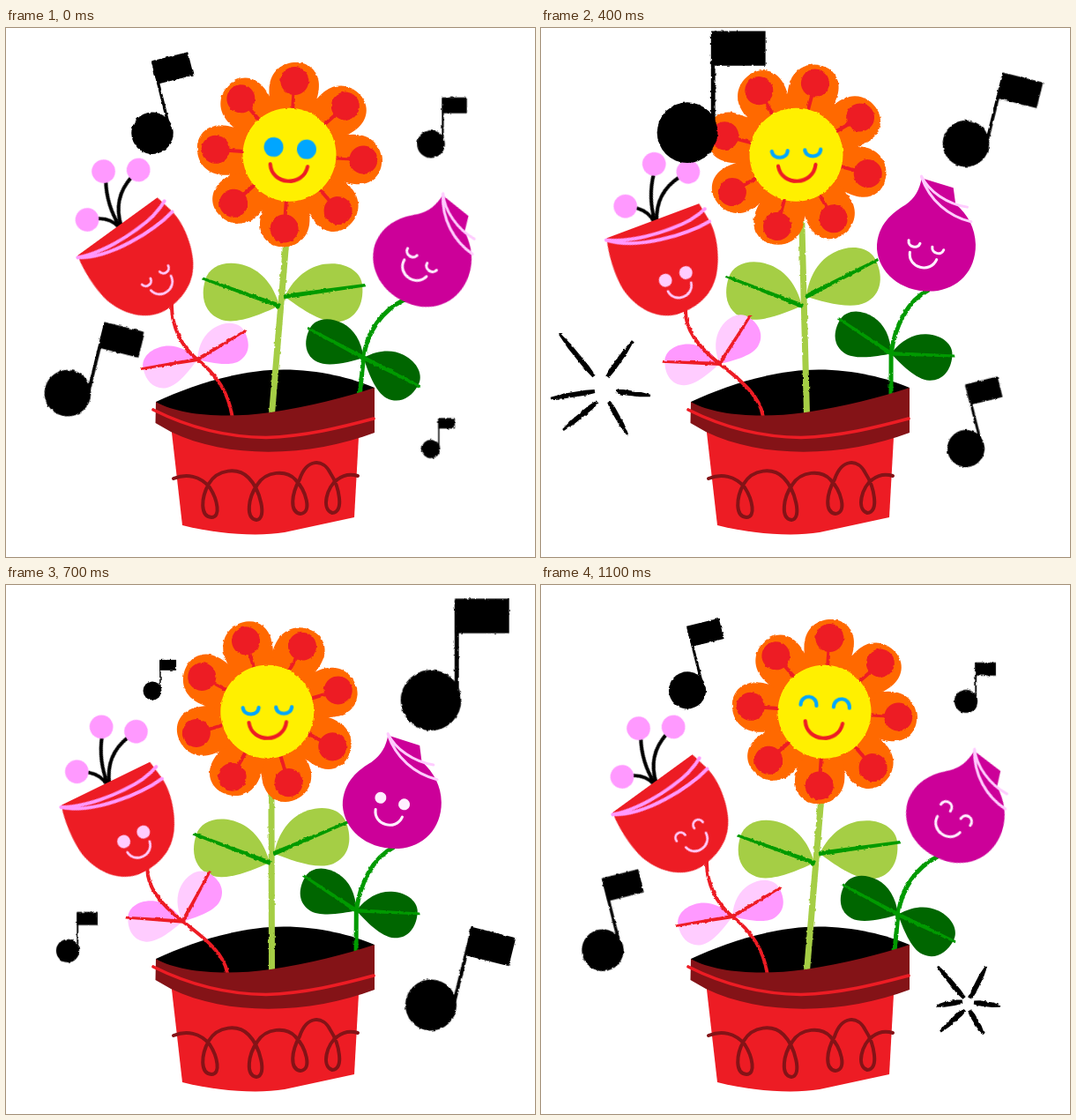
An HTML page for the animation above (1200 ms loop, 600 px wide and 600 px high).

```html
<!DOCTYPE html>
<html lang="en">
<head>
<meta charset="utf-8">
<title>Singing flowers</title>
<style>
  html, body { margin: 0; width: 100%; height: 100%; overflow: hidden; background: #fff; }
  svg { display: block; width: 100%; height: 100%; }
</style>
</head>
<body>
<svg viewBox="0 0 600 600">
  <defs>
    <filter id="rough" filterUnits="userSpaceOnUse" x="0" y="0" width="600" height="600" color-interpolation-filters="sRGB">
      <feTurbulence type="fractalNoise" baseFrequency="0.2" numOctaves="2" seed="4"/>
      <feDisplacementMap in="SourceGraphic" scale="2.8" xChannelSelector="R" yChannelSelector="G"/>
    </filter>
  </defs>
  <g id="stage"></g>
</svg>
<script>
const STEP = 100, STEPS = 12;
const RED = '#ed1c24', DARK = '#841317', ORANGE = '#ff6900', YELLOW = '#fff000', BLUE = '#00a6ff';
const LIME = '#a5ce45', GREEN = '#009a00', FOREST = '#006600';
const PINK = '#ff99ff', PALE = '#ffccff', PURPLE = '#cc0099';

// Pose values are given at these steps and blended in between.
const KEYS = [0, 1, 3, 5, 7, 9, 11];
const SUN_SWAY = [0, .2, .6, 1, .63, .33, 0];
const SUN_SPIN = [4, 6.9, 12.2, 17.4, 28.2, 39.2, 49];
const CUP_SWAY = [0, .2, .6, 1, .92, .5, 0];
const CUP_X = [168, 163.5, 155, 150, 144.5, 156, 168];
const CUP_Y = [279, 278, 280, 283.5, 285.5, 281, 279];
const CUP_TILT = [-36, -31.5, -24, -17, -26, -31, -36];
const BUD_SWAY = [0, .2, .6, 1, .78, .42, .05];

// Eyes per step: o open, U shut, n smiling.
const SUN_EYES = 'ooooUUUUnnnn', CUP_EYES = 'UUUUoooooonn', BUD_EYES = 'UUUUUUoonnnn';

function at(values, k) {
  let i = 0;
  while (i < KEYS.length - 2 && k > KEYS[i + 1]) i++;
  const t = (k - KEYS[i]) / (KEYS[i + 1] - KEYS[i]);
  return values[i] + (values[i + 1] - values[i]) * t;
}

const fill = (d, color) => `<path d="${d}" fill="${color}"/>`;
const line = (d, color, width) =>
  `<path d="${d}" fill="none" stroke="${color}" stroke-width="${width}" stroke-linecap="round" stroke-linejoin="round"/>`;
const dot = (x, y, r, color) => `<circle cx="${x}" cy="${y}" r="${r}" fill="${color}"/>`;
const group = (transform, body) => `<g transform="${transform}">${body}</g>`;
const rough = body => `<g filter="url(#rough)">${body}</g>`;
const place = (x, y, turn = 0, sx = 1, sy = sx) =>
  `translate(${x} ${y}) scale(${sx} ${sy}) rotate(${turn})`;

function face(type, eyeColor, mouthColor, r) {
  const eye = x =>
    type === 'o' ? dot(x, -7.4, r, eyeColor) :
    type === 'U' ? line(`M${x - 9},-5 C${x - 8},5 ${x + 8},5 ${x + 9},-5`, eyeColor, 4.2) :
    line(`M${x - 9},-6 C${x - 9},-19 ${x + 9},-19 ${x + 9},-6`, eyeColor, 4.2);
  return eye(-18.5) + eye(19) + line('M-21,12 C-18,36 18,36 21.5,12', mouthColor, 4.2);
}

// A leaf points along +x from its base; flip -1 mirrors it to the left.
function leaf(l, top, bottom) {
  return group(place(l.x, l.y, l.turn, l.size * l.flip, l.size),
    fill('M0,0 C14,-20 32,-30 50,-30 C74,-30 90,-16 89,0Z', top) +
    fill('M0,0 C14,14 38,37 57,37 C76,37 88,22 89,0Z', bottom));
}
function vein(l, color) {
  const w = 2 / Math.sqrt(l.size);
  return group(place(l.x, l.y, l.turn, l.size * l.flip, l.size),
    fill(`M-1,${-w * 1.3} L92,${-w * .8} L93,${w * .8} L-1,${w * 1.3}Z`, color));
}

function sunflower(k) {
  const s = at(SUN_SWAY, k), cx = 321.5 - 40 * s, spin = at(SUN_SPIN, k);
  const left = { x: 310 - 17.5 * s, y: 315, turn: -19.6 - 2 * s, size: 1, flip: -1 };
  const right = { x: 316 - 19 * s, y: 304.5, turn: -8 - 24 * s, size: 1, flip: 1 };
  const topX = 319.5 - 29.5 * s;
  let petals = '', seeds = '';
  for (let i = 0; i < 8; i++) {
    const turn = `rotate(${spin + i * 45})`;
    petals += group(turn, fill('M0,0 C-14,-30 -30,-55 -28,-78 C-26,-97 -11,-105 2,-105 C18,-105 29,-93 28,-76 C27,-55 14,-30 0,0Z', ORANGE));
    seeds += group(turn, line('M0,-50 L0,-74', RED, 4) + dot(0, -84, 16, RED));
  }
  return leaf(left, LIME, LIME) + leaf(right, LIME, LIME) +
    rough(line(`M301.5,438 L${topX},222`, LIME, 7) + vein(left, GREEN) + vein(right, GREEN) +
      group(place(cx, 143.7), petals + seeds + dot(0, 0, 53, YELLOW))) +
    group(place(cx, 143.7, 4 - 8 * s), face(SUN_EYES[k], BLUE, RED, 11));
}

function cupFlower(k) {
  const s = at(CUP_SWAY, k);
  const jx = 217 - 18 * s, jy = 376 + 6 * s, tx = 188 - 30 * s, ty = 312 + 10 * s;
  const left = { x: jx, y: jy, turn: 9.5 - 14.5 * s, size: .7, flip: -1 };
  const right = { x: jx, y: jy, turn: -31 - 33 * s, size: .7, flip: 1 };
  const stem = `M${256.5 - 6 * s},440 C${253 - 6 * s},418 ${jx + 26},${jy + 20} ${jx},${jy}` +
    ` C${jx - 18},${jy - 14} ${tx - 1},${ty + 25} ${tx},${ty}`;
  const head =
    line('M0,-66 Q2,-95 18,-118', '#000', 4) +
    line('M2,-66 Q12,-97 44,-104', '#000', 4) +
    line('M-1,-66 Q-2,-79 -14,-88', '#000', 4) +
    dot(22, -128, 13.3, PINK) + dot(55, -106, 13.3, PINK) + dot(-25.3, -94.5, 13.3, PINK) +
    fill('M-58,-68 L54,-68 L58,-47 C62,-25 52,5 41,19 C28,36 8,42 -13,41 C-40,38 -56,14 -61,-8 C-64,-25 -63,-48 -58,-68Z', RED) +
    line('M-59,-66 C-30,-52 30,-47 58,-60', PINK, 4) +
    line('M-59,-66 C-30,-43 30,-40 58,-45', PINK, 4) +
    group(place(0, 5, 0, .66), face(CUP_EYES[k], PALE, PALE, 11.3));
  return leaf(left, PINK, PALE) + leaf(right, PALE, PINK) +
    rough(line(stem, RED, 4) + vein(left, RED) + vein(right, RED)) +
    group(place(at(CUP_X, k), at(CUP_Y, k), at(CUP_TILT, k)), head);
}

function budFlower(k) {
  const s = at(BUD_SWAY, k);
  const bx = 405.5 - 10.5 * s, by = 374 - 6 * s, ex = 451 - 14.5 * s, ey = 308.5 - 14 * s;
  const left = { x: bx, y: by, turn: -28 - 7 * s, size: .78, flip: -1 };
  const right = { x: bx, y: by, turn: 27 - 31 * s, size: .78, flip: 1 };
  const stem = `M${401 - 5 * s},418 L${bx},${by} C${bx + 4},${by - 30} ${ex - 24},${ey + 12} ${ex},${ey}`;
  const head =
    fill('M1,-76 L36,-62 L37,-44 C50,-30 57,-15 56,4 C54,34 32,53 4,53 C-32,52 -56,28 -56,0 C-54,-28 -34,-40 -20,-47 C-8,-54 -2,-64 1,-76Z', PURPLE) +
    line('M1,-78 C8,-60 28,-44 50,-39', PALE, 3) +
    line('M1,-77 C8,-50 28,-30 53,-22', PALE, 3) +
    group('rotate(20) translate(0 4) scale(.74)', face(BUD_EYES[k], '#ffeeff', '#ffeeff', 8.8));
  return leaf(left, FOREST, FOREST) + leaf(right, FOREST, FOREST) +
    rough(line(stem, GREEN, 5) + vein(left, GREEN) + vein(right, GREEN)) +
    group(place(472 - 44 * s, 262 - 20 * s, 17 - 27 * s), head);
}

const RAYS = [
  [-49, -68, -10, -20], [34, -60, 5, -19], [-59, 5, -9, -3],
  [54, 2, 15, -3], [-45, 41, -6, 9], [28, 46, 7, 9]
];
const SMALL_RAYS = [
  [-32, -45, -2, -9], [23, -45, 5, -9], [-34, 0, -4, -5],
  [39, 0, 9, -4], [-29, 29, -1, 4], [20, 32, 4, 5]
];

// A brush stroke, thickest in the middle.
function ray([x1, y1, x2, y2]) {
  const len = Math.hypot(x2 - x1, y2 - y1);
  const p = (t, w) =>
    `${x1 + (x2 - x1) * t + (y1 - y2) / len * w},${y1 + (y2 - y1) * t + (x2 - x1) / len * w}`;
  return fill(`M${p(0, 1.2)} L${p(.3, 2.8)} L${p(.8, 3)} L${p(1, 2)} L${p(1, -2)} L${p(.8, -3)} L${p(.3, -2.8)} L${p(0, -1.2)}Z`, '#000');
}

// A note swells for ten phases, then pops into rays.
function note(x, y, phase) {
  if (phase > 9) return group(place(x, y), (phase === 10 ? RAYS : SMALL_RAYS).map(ray).join(''));
  const r = 10.5 + 2.65 * phase;
  const tilt = [0, -14, 14, 0][Math.floor(phase / 3)];
  return group(place(x, y - .15 * phase, tilt, r),
    dot(0, 0, 1, '#000') +
    fill('M.78,-3.3 H.92 V-.35 H.78Z', '#000') +
    fill('M.79,-3.35 H2.58 V-2.21 H.79Z', '#000'));
}

const POT_BACK = fill('M170,424 C210,405 265,387.500 315,387.500 C355,387.500 392,397 418,408 L418,430 L250,450 L170,430Z', '#000');
const POT_FRONT =
  fill('M187,450 L200,564 C240,574 285,577 316,572 L395,555 L400.500,455Z', RED) +
  fill('M170,424 C198,440 250,443 300,436 C345,429 385,419 418,408 L418,459 C350,485 255,491 187,458 L169.500,448Z', DARK) +
  line('M167,433 C195,447 240,464 295,464.500 C340,463 380,453 417,443', RED, 3.6) +
  line('M190,511 C205,505 220,508 231,521 C240,535 244,555 233,555 C220,554 221,533 230,517' +
    ' C240,500 263,498 275,510 C288,523 297,557 284,558 C271,556 275,532 285,518' +
    ' C295,502 318,501 328,512 C340,524 348,550 334,551 C321,549 324,528 333,512' +
    ' C341,488 360,488 368,505 C378,520 384,550 370,550 C357,546 364,520 376,512 C384,506 392,506 399,508', DARK, 4);

function scene(k) {
  const notes = [[166, 120, 5], [70, 415, 6], [482, 132, 2], [482, 477.5, 0]];
  return POT_BACK + sunflower(k) + cupFlower(k) + budFlower(k) + POT_FRONT +
    rough(notes.map(([x, y, lead]) => note(x, y, (k + lead) % STEPS)).join(''));
}

const stage = document.getElementById('stage');
const start = performance.now();
let shown = -1;

function tick() {
  const k = Math.floor((performance.now() - start) / STEP) % STEPS;
  if (k !== shown) {
    stage.innerHTML = scene(k);
    shown = k;
  }
  requestAnimationFrame(tick);
}
tick();
</script>
</body>
</html>
```
